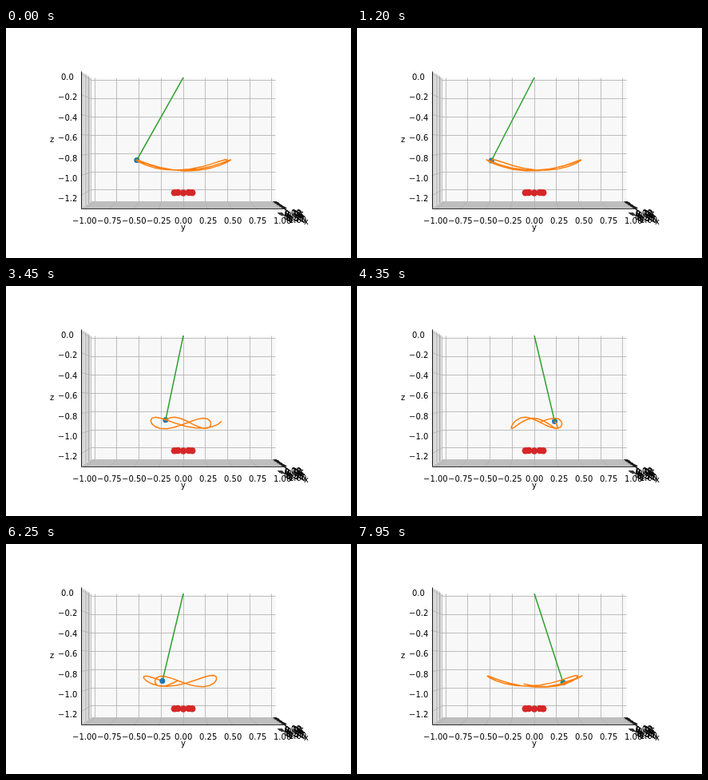
An HTML page with a canvas for the animation above (8000 ms loop, 432 px wide and 288 px high).

```html
<!DOCTYPE html>
<html lang="en">
<head>
<meta charset="utf-8">
<title>Pendulum</title>
<style>
  html, body { margin: 0; width: 100%; height: 100%; overflow: hidden; background: #fff; }
  canvas { display: block; width: 432px; height: 288px; }
</style>
</head>
<body>
<canvas id="stage" width="432" height="288"></canvas>
<script>
const LOOP = 8000, STEP = 50, TRAIL = 33;
const EDGE = 1.0417, TOP = 0.027, BOTTOM = -1.329;
const BLUE = '#1f77b4', ORANGE = '#ff7f0e', GREEN = '#2ca02c', RED = '#d62728';
const GRID = '#b0b0b0';

const ctx = document.getElementById('stage').getContext('2d');
const ticks = Array.from({ length: 9 }, (_, i) => -1 + i / 4);
const levels = Array.from({ length: 7 }, (_, i) => -i / 5);

// Perspective view straight along the x axis.
function project([x, y, z]) {
  const k = 1 / (1 - x / 20.2);
  return [222.05 + 116.55 * y * k, 140.1 - 120.2 * (z + 0.65) * k];
}

function trace(points) {
  ctx.beginPath();
  points.forEach(([x, y]) => ctx.lineTo(x, y));
}

function line(points, color, width) {
  trace(points.map(project));
  ctx.strokeStyle = color;
  ctx.lineWidth = width;
  ctx.stroke();
}

// Thin lines sit on whole pixels.
function thin(points, color = GRID) {
  trace(points.map(p => project(p).map(v => Math.floor(v) + 0.5)));
  ctx.strokeStyle = color;
  ctx.lineWidth = 0.8;
  ctx.stroke();
}

function pane(points, color) {
  trace(points.map(project));
  ctx.fillStyle = color;
  ctx.fill();
}

function dot(p, r, color) {
  const [x, y] = project(p);
  ctx.beginPath();
  ctx.arc(x, y, r, 0, 2 * Math.PI);
  ctx.fillStyle = color;
  ctx.fill();
}

// Centred text, starting on a whole pixel.
function label(text, x, y) {
  const left = x - ctx.measureText(text).width / 2;
  ctx.fillText(text, Math.round(left), Math.round(y + 3.6));
}

const number = (v, digits) => v.toFixed(digits).replace('-', '\u2212');

function drawAxes() {
  const e = EDGE;
  pane([[-e, -e, TOP], [-e, e, TOP], [-e, e, BOTTOM], [-e, -e, BOTTOM]], '#f8f8f8');
  pane([[e, -e, TOP], [-e, -e, TOP], [-e, -e, BOTTOM], [e, -e, BOTTOM]], '#f2f2f2');
  pane([[e, -e, BOTTOM], [-e, -e, BOTTOM], [-e, e, BOTTOM], [e, e, BOTTOM]], '#f6f6f6');

  for (const v of ticks) {
    thin([[v, e, BOTTOM], [v, -e, BOTTOM], [v, -e, TOP]]);
    thin([[e, v, BOTTOM], [-e, v, BOTTOM], [-e, v, TOP]]);
  }
  for (const z of levels) thin([[e, -e, z], [-e, -e, z], [-e, e, z]]);

  thin([[e, -e, TOP], [e, -e, BOTTOM], [e, e, BOTTOM]], '#000');
  line([[-e, e, BOTTOM], [e, e, BOTTOM]], '#000', 0.8);
  for (const v of ticks) {
    thin([[v, e - 0.033, BOTTOM], [v, e + 0.017, BOTTOM]], '#000');
    line([[e - 0.033, v, BOTTOM], [e + 0.017, v, BOTTOM]], '#000', 0.8);
  }
  for (const z of levels) line([[e - 0.033, -e, z], [e + 0.017, -e, z]], '#000', 0.8);

  ctx.font = '10px "DejaVu Sans", sans-serif';
  ctx.fillStyle = '#000';
  ticks.forEach((v, i) => {
    const text = number(v, 2);
    label(text, 222.2 + 123.8 * v, 241);
    label(text, 354 + 1.4 * i, 231.5 + 1.1 * i);
  });
  levels.forEach((z, i) => label(number(z, 1), 77, 61.4 + 25.4 * i));
  label('x', 376, 242.6);
  label('y', 222, 249);
  label('z', 57.5, 139);
}

// Elliptic swing on a unit sphere whose long axis slowly turns backwards.
function bobAt(t) {
  const swing = Math.PI - 0.22 + 5.678 * t;
  const turn = 0.044 + (t < 0 ? 0.29 : 0.394) * t;
  const major = 0.517 * Math.cos(swing), minor = 0.245 * Math.sin(swing);
  const y = major * Math.cos(turn) + minor * Math.sin(turn);
  const x = major * Math.sin(turn) - minor * Math.cos(turn);
  return [x, y, -Math.sqrt(1 - x * x - y * y)];
}

function drawMagnets() {
  for (let i = 0; i < 5; i++) {
    const a = 2 * Math.PI * i / 5;
    dot([0.1 * Math.cos(a), 0.1 * Math.sin(a), -1.2], 4.3, RED);
  }
}

function drawPendulum(t) {
  const bob = bobAt(t);
  const path = Array.from({ length: TRAIL + 1 }, (_, i) => bobAt(t - (TRAIL - i) * STEP / 1000));
  const layers = [
    () => dot(bob, 3.5, BLUE),
    () => line([[0, 0, 0], bob], GREEN, 1.5),
    () => line(path, ORANGE, 1.5)
  ];
  // The nearer half of the swing puts the bob in front.
  if (bob[0] > 0) layers.reverse();
  layers.forEach(draw => draw());
}

function frame(now) {
  const ms = Math.floor((now % LOOP) / STEP) * STEP;
  ctx.fillStyle = '#fff';
  ctx.fillRect(0, 0, 432, 288);
  ctx.lineJoin = 'round';
  drawAxes();
  drawMagnets();
  drawPendulum(ms / 1000);
  requestAnimationFrame(frame);
}

frame(0);
</script>
</body>
</html>
```
